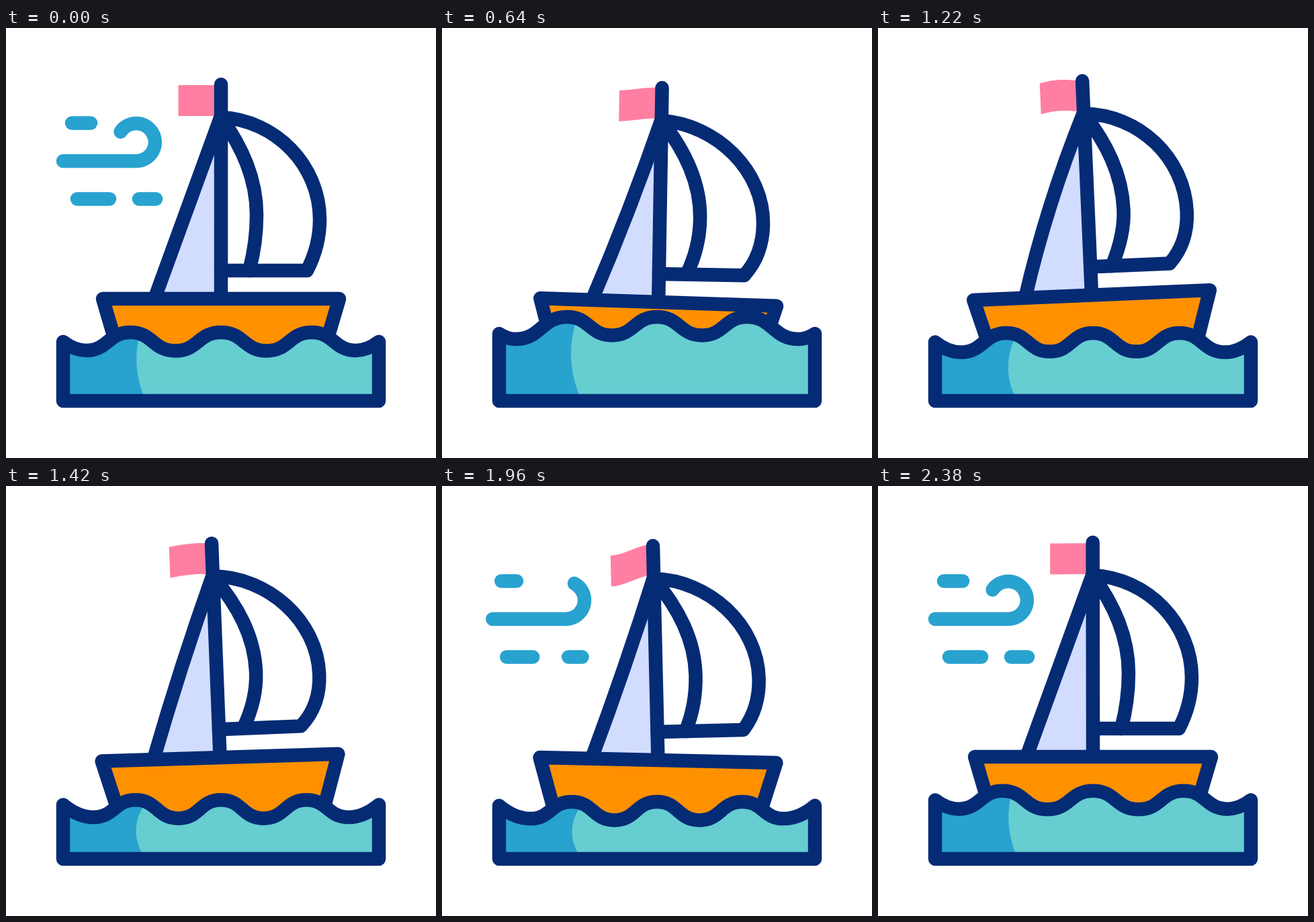
An HTML page with a canvas that plays this animation: 640 px wide and 640 px high, repeating every 2.4 s.

```html
<!DOCTYPE html>
<html>
<head>
<meta charset="utf-8">
<style>
html, body { margin: 0; height: 100%; overflow: hidden; background: #fff; }
canvas { display: block; }
</style>
</head>
<body>
<canvas id="stage" width="640" height="640"></canvas>
<script>
const ctx = document.getElementById('stage').getContext('2d');
const LOOP = 2400, RAD = Math.PI / 180;
const NAVY = '#052b75', BLUE = '#28a2cf';

// Poses of each part at these times, joined by smooth periodic curves
const TIMES = [0, 380, 900, 1220, 1640, 1960];
const POSES = {
  hullX:   [320, 321, 322.5, 318, 320, 321.5],
  hullY:   [403, 406, 408, 397.5, 412.5, 408],
  hullA:   [0, 0.65, 2.28, -2.4, -0.1, 1.3],
  mastA:   [0, 1.8, -0.45, -2.5, -1.62, -1.35],
  boom:    [0, 0, -3, -10, 0, 0],
  bulge:   [0, 4, 8, 0, 12, 6],
  stay:    [0, -1, -3, 6, -3, -2],
  flagTip: [0, -7, 14, 0, 7, 12],
  flagArc: [0, -2, 0, -4, 0, 0],
  swell:   [0, -16, -24, 1, 24, 17],
  squeeze: [0, 1, 2, 6, 9, 8]
};

function sample(values, t) {
  const n = TIMES.length;
  const time = k => TIMES[(k + n) % n] + LOOP * Math.floor(k / n);
  const value = k => values[(k + n) % n];
  const slope = k => (value(k + 1) - value(k - 1)) / (time(k + 1) - time(k - 1));
  let i = n - 1;
  while (TIMES[i] > t) i--;
  const d = time(i + 1) - time(i), u = (t - time(i)) / d, v = 1 - u;
  return v * v * ((1 + 2 * u) * value(i) + u * d * slope(i)) +
         u * u * ((1 + 2 * v) * value(i + 1) - v * d * slope(i + 1));
}

function ease(t, start, length) {
  const u = Math.min(1, Math.max(0, (t - start) / length));
  return u * u * (3 - 2 * u);
}

function stroke(path, color = NAVY) {
  ctx.strokeStyle = color;
  ctx.stroke(path);
}

function fill(path, color) {
  ctx.fillStyle = color;
  ctx.fill(path);
}

const gust = new Path2D('M85 198H194.5A28 28 0 1 0 170.5 154.5');
const dash = (x, y, length) => new Path2D(`M${x} ${y}h${length}`);
const WINDS = [
  { path: dash(98, 141.5, 28), length: 28, start: 0, span: 385, drift: 0 },
  { path: gust, length: 226, start: 125, span: 475, drift: 38 },
  { path: dash(106, 254.5, 48), length: 48, start: 0, span: 340, drift: 0 },
  { path: dash(198, 254.5, 25), length: 25, start: 230, span: 370, drift: 47 }
];

function drawWind(t) {
  const shown = ease(t, 1600, 500);
  for (const w of WINDS) {
    const gone = ease(t, w.start, w.span);
    const leaving = t < 1200;
    if (leaving ? gone >= 1 : shown <= 0) continue;
    const from = leaving ? gone * w.length : 0;
    const to = leaving ? w.length + 5 : Math.max(0.1, shown * w.length + (shown === 1 ? 5 : 0));
    ctx.save();
    ctx.translate(leaving ? gone * w.drift : 51.5 * (shown - 1), 0);
    ctx.setLineDash([to - from, 1000]);
    ctx.lineDashOffset = -from;
    stroke(w.path, BLUE);
    ctx.restore();
  }
}

function drawRig(p) {
  ctx.save();
  ctx.translate(p.hullX, p.hullY);
  ctx.rotate(p.mastA * RAD);

  const tip = p.flagTip - 318, hoist = -318 - 0.3 * p.flagTip, arc = p.flagArc * 1.33;
  fill(new Path2D(`M0 ${hoist}C-21 ${hoist + arc}-43 ${tip + arc}-63.5 ${tip}v46
    C-43 ${tip + arc + 46}-21 ${hoist + arc + 46} 0 ${hoist + 46}Z`), '#ff7fa2');

  const a = (p.hullA - p.mastA) * RAD;
  const footX = -99 * Math.cos(a), footY = -99 * Math.sin(a);
  const stay = `M0-272Q${footX / 2 - 2 * p.stay} ${(footY - 272) / 2} ${footX} ${footY}`;
  fill(new Path2D(stay + 'L0 0Z'), '#d2dcfe');
  stroke(new Path2D(stay));

  const { boom, bulge } = p, outer = 147 + bulge, inner = 53 + bulge;
  stroke(new Path2D(`M0-270C82-266 ${outer}-198 ${outer}-118
    C${outer}-91 ${140 + bulge}-65 ${128 + boom}-42H0`));
  stroke(new Path2D(`M0-270C${32 + bulge * 0.6}-225 ${inner}-178 ${inner}-125
    C${inner}-96 ${49 + boom / 2 + bulge * 0.7}-68 ${42 + boom}-42`));
  stroke(new Path2D('M0-319V0'));
  ctx.restore();
}

function drawHull(p) {
  ctx.save();
  ctx.translate(p.hullX, p.hullY);
  ctx.rotate(p.hullA * RAD);
  const hull = new Path2D('M-176 0H176L146 102H-146Z');
  fill(hull, '#ff9100');
  stroke(hull);
  ctx.restore();
}

function drawWater({ swell, squeeze }) {
  const edge = 467 + 0.52 * swell, crest = 453 + swell;
  const dipX = 119 + 0.45 * swell + 0.6 * squeeze;
  const dipY = 480 + 0.75 * swell + 0.3 * squeeze;
  const crestX = 185 + squeeze, midX = 252 + 0.6 * squeeze;
  const knots = [
    [dipX, dipY], [crestX, crest], [midX, crest + 27.5], [320, crest],
    [640 - midX, crest + 27.5], [640 - crestX, crest], [640 - dipX, dipY]
  ];
  const water = new Path2D();
  water.moveTo(85, edge);
  water.quadraticCurveTo((85 + dipX) / 2, dipY, dipX, dipY);
  for (let i = 1; i < knots.length; i++) {
    const [x0, y0] = knots[i - 1], [x, y] = knots[i], mid = (x0 + x) / 2;
    water.bezierCurveTo(mid, y0, mid, y, x, y);
  }
  water.quadraticCurveTo(640 - (85 + dipX) / 2, dipY, 555, edge);
  water.lineTo(555, 555);
  water.lineTo(85, 555);
  water.closePath();
  fill(water, '#66cdd1');

  const shadeX = 188 + 0.2 * Math.min(swell, 0) - 0.6 * squeeze;
  const shadeTop = crest + 7;
  ctx.save();
  ctx.clip(water);
  fill(new Path2D(`M85 400H${198 + squeeze}V${shadeTop}
    Q${shadeX} ${(shadeTop + 545) / 2} ${204 - 0.3 * squeeze} 545V555H85Z`), BLUE);
  ctx.restore();
  stroke(water);
}

function frame(now) {
  const t = now % LOOP, pose = {};
  for (const key in POSES) pose[key] = sample(POSES[key], t);
  ctx.clearRect(0, 0, 640, 640);
  ctx.lineWidth = 20.5;
  ctx.lineCap = ctx.lineJoin = 'round';
  drawWind(t);
  drawRig(pose);
  drawHull(pose);
  drawWater(pose);
}

const begin = performance.now();
function tick() {
  frame(performance.now() - begin);
  requestAnimationFrame(tick);
}
tick();
</script>
</body>
</html>
```
